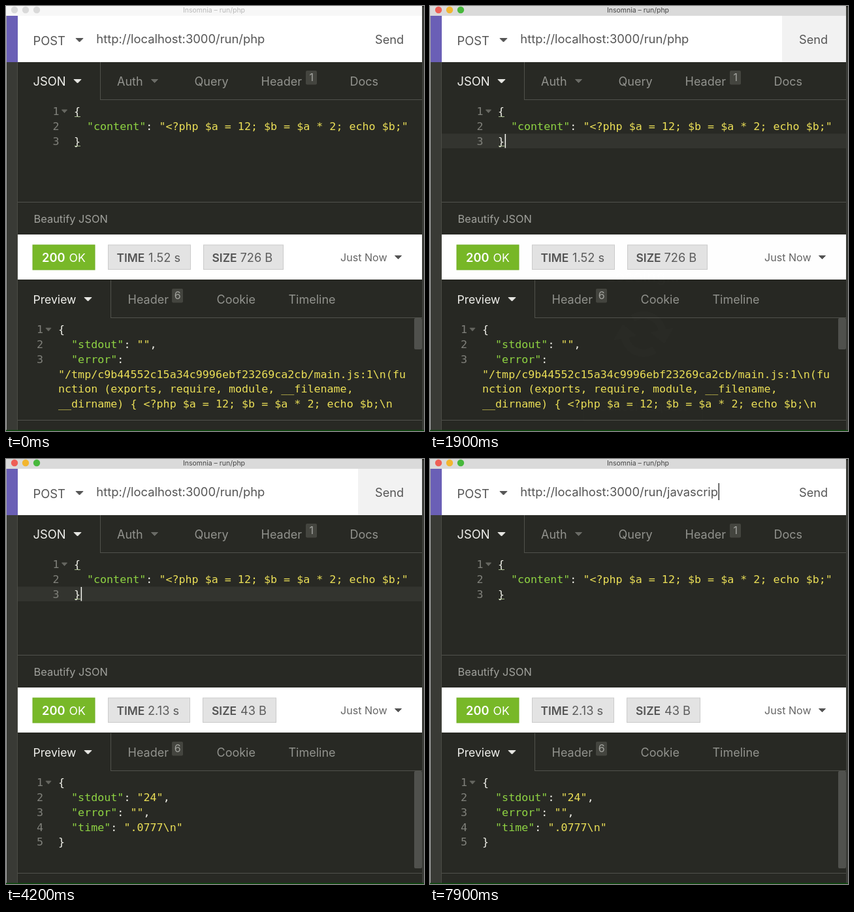
Recreate the animation shown at these times as an HTML page. Size 640x651 px, loop 8 s.

```html
<!DOCTYPE html>
<html lang="en">
<head>
<meta charset="utf-8">
<title>Request run</title>
<style>
html, body { margin: 0; width: 100%; height: 100%; overflow: hidden; background: #282924; }
svg { display: block; width: 100vw; height: 100vh; }
text { font-family: Inter, sans-serif; white-space: pre; }
.code { font: 16.68px "DejaVu Sans Mono", monospace; }
</style>
</head>
<body>
<svg id="stage" viewBox="0 0 640 651"></svg>
<script>
const REQUEST_START = 1900, REQUEST_END = 4030;
const FOCUS = 500, URL_FOCUS = 5400, TYPE_START = 6400, TYPE_STEP = 175;
const ROW = 22.75, URL_X = 138.3;

const esc = s => s.replace(/&/g, '&amp;').replace(/</g, '&lt;');
const rect = (x, y, w, h, fill, extra = '') =>
  `<rect x="${x}" y="${y}" width="${w}" height="${h}" fill="${fill}" ${extra}/>`;
const text = (x, y, size, fill, s, extra = '') =>
  `<text x="${x}" y="${y}" font-size="${size}" fill="${fill}" ${extra}>${esc(s)}</text>`;
const arrow = (x, y, w, h, fill) =>
  `<path d="M${x} ${y}h${w}l${-w / 2} ${h}z" fill="${fill}" stroke="${fill}" stroke-linejoin="round"/>`;
const group = (id, body) => `<g id="${id}">${body}</g>`;

const YELLOW = '#ebdf57', GREEN = '#8fd443', PLAIN = '#f1f1ea';
const paint = (fill, s) => `<tspan fill="${fill}">${esc(s)}</tspan>`;

// Keys green, strings yellow, punctuation plain
function highlight(line) {
  return line.split(/("[^"]*")/).map((part, i, all) => {
    if (i % 2 === 0) return paint(PLAIN, part);
    return paint(all[i + 1].startsWith(':') ? GREEN : YELLOW, part);
  }).join('');
}

function code(x, y, lines, numberX, numbered = lines.length) {
  return lines.map((line, i) => {
    const base = y + i * ROW, own = i < numbered;
    const number = own
      ? `<text class="code" x="${numberX}" y="${base}" fill="#80817b">${i + 1}</text>` : '';
    return number + `<text class="code" x="${x}" y="${base}">${own ? highlight(line) : paint(YELLOW, line)}</text>`;
  }).join('') + arrow(numberX + 14, y - 8, 8, 4.5, '#666761');
}

function tabs(y, edge, first, size, arrowX, others) {
  const line = '#51524c';
  return text(41.5, y + 35.5, size, '#f0f0ec', first) + arrow(arrowX, y + 26.5, 11, 5.5, '#e8e8e4') +
    rect(edge, y, 1, 58, line) + rect(edge, y + 57, 637 - edge, 1, line) +
    others.map(([x, s]) => text(x, y + 35.5, 18, '#92938e', s)).join('');
}

const badge = (x, y, s) => rect(x, y, 17, 21.5, '#44453f', 'rx="2"') +
  text(x + 8.8, y + 16, 16, '#a4a5a0', s, 'text-anchor="middle"');

function pill(x, w, label, labelX, value, valueX) {
  return rect(x + .5, 366, w, 37.5, '#e3e3e3', 'stroke="#cbcbcb"') +
    text(labelX, 392, 17.4, '#555', label, 'font-weight="600"') +
    text(valueX, 392, 18.2, '#5c5c5c', value);
}

const spinArm = `<path d="M-28 8A29 29 0 0 1 4 -28.7" fill="none" stroke="#e6e6e6" stroke-width="11"/>
  <path d="M6 -44L22 -26L2 -13z" fill="#e6e6e6" stroke="#e6e6e6" stroke-width="2" stroke-linejoin="round"/>`;

const titleBar = (bg, ink, dots) => rect(0, 0, 637, 15, bg) +
  dots.map((c, i) => `<circle cx="${13 + 17 * i}" cy="6" r="5.2" fill="${c}"/>`).join('') +
  text(318.5, 10, 10.5, ink, 'Insomnia – run/php', 'text-anchor="middle"');

const frame = rect(0, 0, 640, 651, '#282924') +
  rect(1, 86, 16, 564, '#393a35') + rect(17, 86, 1, 564, '#4a4b45') +
  rect(1, 15, 17, 71, '#6a5fb6') + rect(18, 15, 619, 71, '#fff');

const head = text(41.5, 59.5, 18.4, '#555', 'POST') + arrow(107, 49.5, 11, 5.5, '#555') +
  group('hover', rect(539, 15, 98, 71, '#f2f2f2')) +
  text(565, 58, 18.2, '#555', 'Send') +
  `<rect id="selection" y="37" height="27" fill="#dcdcdc"/>` +
  text(URL_X, 57, 18.4, '#555', '', 'id="url"') + rect(0, 37, 1.3, 26, '#222', 'id="urlCaret"');

const request = tabs(86, 144, 'JSON', 18.4, 104, [[170, 'Auth'], [288.5, 'Query'], [390.5, 'Header'], [526.5, 'Docs']]) +
  arrow(222.5, 112.5, 10, 5, '#696a65') + badge(459, 99, '1') +
  group('activeLine', rect(18, 195.5, 619, 22.5, '#33342f')) +
  code(103.9, 167, ['{', '  "content": "<?php $a = 12; $b = $a * 2; echo $b;"', '}'], 71.5) +
  rect(105, 169, 9, 1, '#a5b98a') + rect(105, 214, 9, 1, '#a5b98a') +
  rect(114.6, 196, 1.5, 21.5, '#f8f8f2', 'id="caret"') +
  rect(18, 300, 619, 1, '#51524c') + text(42.5, 331.5, 16.4, '#a0a19c', 'Beautify JSON');

const before = pill(156, 126, 'TIME', 169.5, '1.52 s', 218) + pill(302, 122, 'SIZE', 315.5, '726 B', 358.5) +
  rect(625, 478, 12, 48, '#50514d', 'rx="2"') +
  code(80, 501.3, ['{', '  "stdout": "",', '  "error":',
    '"/tmp/c9b44552c15a34c9996ebf23269ca2cb/main.js:1\\n(fu',
    'nction (exports, require, module, __filename,',
    '__dirname) { <?php $a = 12; $b = $a * 2; echo $b;\\n'], 47, 3);

const after = pill(156, 125, 'TIME', 169.5, '2.13 s', 217) + pill(301, 112, 'SIZE', 315, '43 B', 359) +
  rect(625, 478, 12, 149, '#50514d', 'rx="2"') +
  code(80, 501.3, ['{', '  "stdout": "24",', '  "error": "",', '  "time": ".0777\\n"', '}'], 47);

const response = rect(18, 350, 619, 69, '#fff') +
  rect(41, 366, 95, 38, '#78b828', 'stroke="#70ad24"') +
  text(55, 392, 18.3, '#fff', '200', 'font-weight="600"') + text(96.5, 392, 17.6, '#fff', 'OK') +
  text(512, 391, 16.1, '#666', 'Just Now') + arrow(595.5, 382.5, 10, 5, '#555') +
  tabs(420, 160, 'Preview', 17.6, 120, [[186.5, 'Header'], [322.5, 'Cookie'], [432.5, 'Timeline']]) +
  badge(254, 433, '6') + group('before', before) + group('after', after) +
  rect(18, 634, 619, 1, '#51524c');

const overlay = rect(18, 350, 619, 300, '#181818', 'opacity=".73"') +
  text(326, 422, 24, '#e8e8e8', '', 'id="status" text-anchor="middle"') +
  group('spinner', spinArm + `<g transform="rotate(180)">${spinArm}</g>`) +
  rect(234.5, 589.5, 183, 46, '#20211f', 'rx="4" stroke="#6b6b69"') +
  text(326, 620, 18.2, '#ececec', 'Cancel Request', 'text-anchor="middle"');

document.getElementById('stage').innerHTML = frame + head + request + response +
  group('overlay', overlay) +
  group('inactive', titleBar('#f7f7f7', '#b8b8b8', ['#d9d9d9', '#d9d9d9', '#d9d9d9'])) +
  group('active', titleBar('#dadada', '#444', ['#ee5f56', '#f2b62f', '#47b83c'])) +
  rect(0, 15, 1, 636, '#a9a9a9') + rect(637, 2, 3, 649, '#3b3c38') + rect(0, 649.5, 640, 1.5, '#0a4a0a');

const $ = id => document.getElementById(id);
const show = (id, on) => $(id).setAttribute('visibility', on ? 'visible' : 'hidden');
const between = (t, a, b) => t >= a && t < b;

function draw(t) {
  const focused = between(t, FOCUS, URL_FOCUS);
  const loading = t > REQUEST_START && t < REQUEST_END;
  const typing = t >= TYPE_START;

  show('inactive', t < FOCUS);
  show('active', t >= FOCUS);
  show('activeLine', focused);
  show('caret', focused && (t - FOCUS) % 1060 < 530);
  show('hover', between(t, 1300, 4900));
  show('before', t < REQUEST_END);
  show('after', t >= REQUEST_END);

  show('overlay', loading);
  const elapsed = (t - REQUEST_START) / 1000;
  $('overlay').setAttribute('opacity', Math.max(0, Math.min(1, elapsed / .4)));
  $('status').textContent = elapsed < 1 ? 'Loading...' : elapsed.toFixed(1) + ' seconds...';
  $('spinner').setAttribute('transform', `translate(327 502.5) rotate(${(t - 2500) * .18})`);

  const typed = 'javascrip'.slice(0, Math.max(0, Math.floor((t - TYPE_START) / TYPE_STEP) + 1));
  const url = $('url'), base = 'http://localhost:3000/run/';
  url.textContent = base + (typing ? typed : 'php');
  const end = url.getComputedTextLength(), start = url.getSubStringLength(0, base.length);
  $('selection').setAttribute('x', URL_X + start);
  $('selection').setAttribute('width', end - start);
  show('selection', between(t, URL_FOCUS, TYPE_START));
  $('urlCaret').setAttribute('x', URL_X + end + .5);
  show('urlCaret', typing);
}

function tick() {
  draw(performance.now() % 8000);
  requestAnimationFrame(tick);
}
tick();
</script>
</body>
</html>
```
